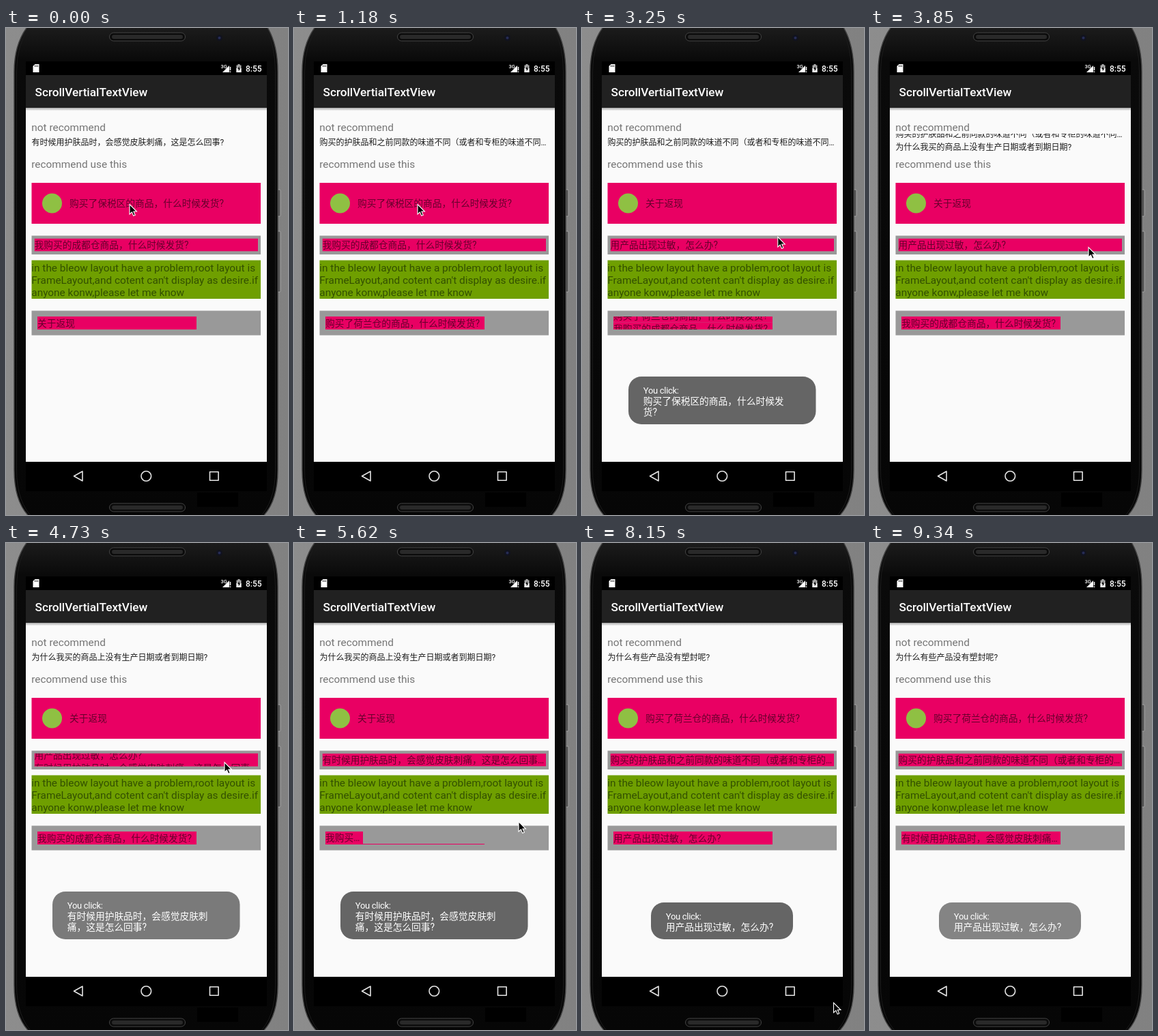
An HTML page for the animation above (9410 ms loop, 413x714 px).

```html
<!DOCTYPE html>
<html lang="zh-CN">
<head>
<meta charset="utf-8">
<style>
html, body { margin: 0; width: 100%; height: 100%; overflow: hidden; background: #868686; }
svg { display: block; }
text { font-family: Roboto, "Noto Sans CJK SC", "Noto Sans CJK", sans-serif; white-space: pre; }
.label { font-size: 15.4px; fill: #757575; }
.note { font-size: 15.4px; fill: #335000; }
.toast { font-size: 13.73px; fill: #fff; }
.toast .latin { font-size: 13px; letter-spacing: -.3px; }
</style>
</head>
<body>
<svg id="stage" width="413" height="714" viewBox="0 0 413 714">
  <defs>
    <linearGradient id="wall"><stop offset="0" stop-color="#8d8d8d"/><stop offset="1" stop-color="#818181"/></linearGradient>
    <linearGradient id="body" x2="0" y2="1">
      <stop offset="0" stop-color="#1d1d1d"/><stop offset=".07" stop-color="#0a0a0a"/>
      <stop offset=".5" stop-color="#080808"/><stop offset="1" stop-color="#060606"/>
    </linearGradient>
    <linearGradient id="shade" x2="0" y2="1"><stop offset="0" stop-opacity=".32"/><stop offset="1" stop-opacity="0"/></linearGradient>
    <g id="speaker">
      <rect x=".5" y=".5" width="111" height="12" rx="6" fill="#0b0b0b" stroke="#444"/>
      <rect x="4" y="3.5" width="104" height="6" rx="3" fill="#292929"/>
    </g>
  </defs>

  <rect width="413" height="714" fill="url(#wall)"/>
  <rect x="397" y="237" width="5" height="39" rx="1.5" fill="#555" stroke="#b5b5b5" stroke-width=".8"/>
  <rect x="397" y="298" width="5" height="89" rx="1.5" fill="#555" stroke="#b5b5b5" stroke-width=".8"/>
  <path d="M33 -4Q12 22 12 64V648Q12 698 38 720H372Q398 698 398 648V64Q398 22 381 -4Z" fill="url(#body)" stroke="#424242" stroke-width="1.4"/>
  <path d="M36 -4Q15.500 24 15.500 64V648Q15.500 696 41 720H369Q394.500 696 394.500 648V64Q394.500 24 378 -4Z" fill="none" stroke="#1b1b1b"/>
  <use href="#speaker" x="151" y="6.500"/>
  <use href="#speaker" x="151" y="696.500"/>
  <circle cx="312.500" cy="14.500" r="4.500" fill="#11131f"/>
  <circle cx="312.500" cy="14.500" r="2" fill="#262c55"/>

  <rect x="29" y="49" width="353" height="630" fill="#000"/>
  <rect x="280" y="681" width="60" height="21" fill="#000"/>
  <path d="M42.500 53H48.500V65H39.500V56Z" fill="#fff"/>
  <path d="M42.500 54.500V57M44.500 54.500V57M46.500 54.500V57" stroke="#000" stroke-width=".8"/>
  <text x="314.500" y="59" font-size="7.500" font-weight="500" fill="#fff">3G</text>
  <path d="M317 65L327 55V65Z" fill="#fff"/>
  <path d="M328.500 57V62M328.500 63.500V65" stroke="#fff" stroke-width="1.500"/>
  <path d="M337.500 54.500H339.500V53H342.500V54.500H344.500V65H337.500Z" fill="#aaa"/>
  <path d="M337.500 59H344.500V65H337.500Z" fill="#fff"/>
  <path d="M341.700 56L339 60.300H340.700V63.500L343.300 59.200H341.700Z" fill="#000"/>
  <text x="351" y="63.500" font-size="12" font-weight="500" fill="#fff">8:55</text>

  <rect x="29" y="69" width="353" height="48" fill="#212121"/>
  <text x="42.500" y="100" font-size="17.200" font-weight="500" fill="#fff">ScrollVertialTextView</text>
  <rect x="29" y="117" width="353" height="519" fill="#fafafa"/>
  <rect x="29" y="117" width="353" height="4.500" fill="url(#shade)"/>

  <text class="label" x="37.300" y="151">not recommend</text>
  <text class="label" x="37.300" y="205">recommend use this</text>
  <rect x="37.500" y="227" width="335.500" height="60" fill="#e90063"/>
  <rect x="37.500" y="304.500" width="335.500" height="27.500" fill="#999"/>
  <rect x="37.500" y="340.500" width="335.500" height="56.500" fill="#6f9f00"/>
  <text class="note" x="37.300" y="357">in the bleow layout have a problem,root layout is</text>
  <text class="note" x="37.300" y="375">FrameLayout,and cotent can't display as desire.if</text>
  <text class="note" x="37.300" y="393">anyone konw,please let me know</text>
  <rect x="37.500" y="414.500" width="335.500" height="36" fill="#999"/>
  <g id="lanes"></g>
  <g id="toasts"></g>

  <g fill="none" stroke="#e4e4e4" stroke-width="1.600" stroke-linejoin="round">
    <path d="M112 650V664L99.500 657Z"/>
    <circle cx="205.300" cy="657" r="7.300"/>
    <rect x="298.500" y="650.700" width="12.600" height="12.600"/>
  </g>
  <path id="cursor" d="M0 0V14.500L3.400 11.400L5.700 16.800L8.200 15.700L5.900 10.500H10.400Z" fill="#000" stroke="#fff" stroke-width="1.100"/>
</svg>
<script>
const LOOP = 9410, STEP = 148;
const PINK = '#e90063', DIM = 'rgba(0,0,0,.56)';
const $ = id => document.getElementById(id);

function add(parent, tag, attrs = {}, content = '') {
  const el = document.createElementNS('http://www.w3.org/2000/svg', tag);
  for (const k in attrs) el.setAttribute(k, attrs[k]);
  if (content) el.textContent = content;
  return parent.appendChild(el);
}
const clamp = v => Math.max(0, Math.min(1, v));
const ease = p => (1 - Math.cos(Math.PI * clamp(p))) / 2;

const BONDED = '购买了保税区的商品，什么时候发货?';
const CASHBACK = '关于返现';
const DUTCH = '购买了荷兰仓的商品，什么时候发货?';
const CHENGDU = '我购买的成都仓商品，什么时候发货?';
const ALLERGY = '用产品出现过敏，怎么办?';
const STING = '有时候用护肤品时，会感觉皮肤刺痛，这是怎么回事';
const SMELL = '购买的护肤品和之前同款的味道不同（或者和专柜的';

// Each lane is a clipped window whose rows slide upwards one by one.
const lanes = [
  { x: 37.5, y: 155, w: 336, h: 25, tx: 0, ty: 17, size: 12, ink: '#1c1c1c',
    step: 19, start: 202, period: 3064, dur: 1000,
    rows: [STING + '?', SMELL + '味道不同…', '为什么我买的商品上没有生产日期或者到期日期?', '为什么有些产品没有塑封呢?'] },
  { x: 37.5, y: 227, w: 335.5, h: 60, tx: 55.5, ty: 35.3, size: 13.73, ink: DIM, icon: true,
    step: 60, start: 1868, period: 4539, dur: 1000,
    rows: [BONDED, CASHBACK, DUTCH] },
  { x: 41.5, y: 308.5, w: 327.5, h: 19, tx: 0, ty: 14.8, size: 13.73, ink: DIM, fill: PINK,
    step: 19, start: 1590, period: 2800, dur: 800,
    rows: [CHENGDU, ALLERGY, STING + '…', SMELL + '…'] },
  { x: 46, y: 423, w: 233, h: 19, tx: 0, ty: 14.8, size: 13.73, ink: DIM, fill: PINK,
    step: 19, start: 145, period: 2680, dur: 800, squeeze: { row: 2, w: 55, text: '我购买…' },
    rows: [CASHBACK, DUTCH, CHENGDU, ALLERGY, '有时候用护肤品时，会感觉皮肤刺痛…'] }
];

for (const l of lanes) {
  const box = add($('lanes'), 'svg', { x: l.x, y: l.y, width: l.w, height: l.h, overflow: 'hidden' });
  l.parts = l.rows.map(row => {
    const g = add(box, 'g');
    const back = l.fill && add(g, 'rect', { width: l.w, height: l.h, fill: l.fill });
    if (l.icon) add(g, 'circle', { cx: 30, cy: 30, r: 14.5, fill: '#8fc043' });
    const label = add(g, 'text', { x: l.tx, y: l.ty, 'font-size': l.size, fill: l.ink }, row);
    return { g, back, label };
  });
}

function drawLane(l, t) {
  const n = Math.max(0, Math.min(l.rows.length - 1, Math.floor((t - l.start) / l.period) + 1));
  const p = n ? ease((t - l.start - (n - 1) * l.period) / l.dur) : 1;
  l.parts.forEach(({ g, back, label }, i) => {
    const leaving = i === n - 1 && p < 1;
    g.style.display = i === n || leaving ? '' : 'none';
    g.setAttribute('transform', `translate(0 ${(i === n ? 1 - p : -p) * l.step})`);
    if (l.squeeze && l.squeeze.row === i) {
      back.setAttribute('width', leaving ? l.squeeze.w : l.w);
      label.textContent = leaving ? l.squeeze.text : l.rows[i];
    }
  });
}

const toasts = [
  { x: 68, y: 511, w: 274.5, h: 70, from: 1380, fade: 3520, lines: ['购买了保税区的商品，什么时候发', '货?'] },
  { x: 68, y: 511, w: 274.5, h: 70, from: 4480, fade: 6672, lines: ['有时候用护肤品时，会感觉皮肤刺', '痛，这是怎么回事?'] },
  { x: 101, y: 527, w: 208, h: 54, from: 7080, fade: 9260, lines: [ALLERGY] }
];
for (const o of toasts) {
  o.g = add($('toasts'), 'g', { class: 'toast', transform: `translate(${o.x} ${o.y})` });
  add(o.g, 'rect', { width: o.w, height: o.h, rx: 19, fill: '#656565' });
  add(o.g, 'text', { x: 21.8, y: 24.5, class: 'latin' }, 'You click:');
  o.lines.forEach((s, i) => add(o.g, 'text', { x: 21.8, y: 41 + 16 * i }, s));
}
function drawToast(o, t) {
  const a = clamp((t - o.from) / 300) * (1 - clamp((t - o.fade) / 300));
  o.g.style.display = a ? '' : 'none';
  o.g.querySelector('rect').setAttribute('fill-opacity', a);
  o.g.setAttribute('opacity', a < .3 ? a / .3 : 1);
}

// Pointer stops: time, x, y
const path = [
  [0, 181, 258.5], [2750, 181, 258.5], [3500, 320, 321.5], [4750, 320, 321.5],
  [5450, 329, 408.5], [6100, 329, 408.5], [6600, 334, 430], [7150, 334, 430], [7900, 368.5, 674]
];
function drawCursor(t) {
  let i = path.length - 1;
  while (path[i][0] > t) i--;
  const a = path[i], b = path[i + 1] || a;
  const p = ease((t - a[0]) / (b[0] - a[0] || 1));
  $('cursor').setAttribute('transform', `translate(${a[1] + (b[1] - a[1]) * p} ${a[2] + (b[2] - a[2]) * p})`);
  $('cursor').style.display = t < 8700 ? '' : 'none';
}

function draw(ms) {
  // The screen refreshes about seven times a second.
  const t = Math.floor((ms % LOOP + 20) / 148.25) * STEP;
  for (const l of lanes) drawLane(l, t);
  for (const o of toasts) drawToast(o, t);
  drawCursor(t);
}

const began = performance.now();
function tick() {
  draw(performance.now() - began);
  requestAnimationFrame(tick);
}
tick();
</script>
</body>
</html>
```
